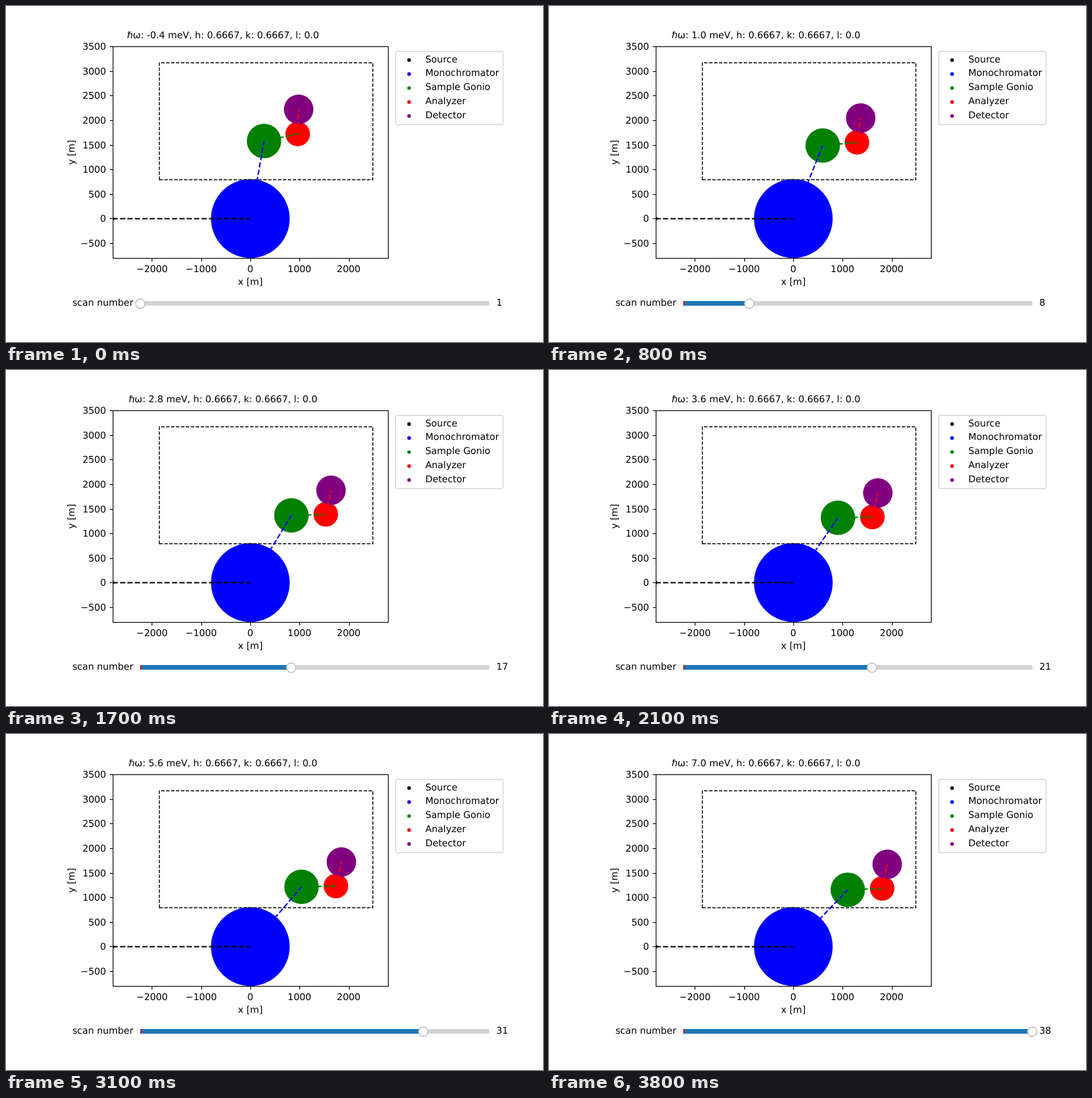
An HTML page that plays this animation: 800 by 500 pixels, repeating every 3.9 s.

```html
<!DOCTYPE html>
<html lang="en">
<head>
<meta charset="utf-8">
<title>Spectrometer scan</title>
<style>
  html, body { margin: 0; width: 100%; height: 100%; overflow: hidden; background: #fff; }
  svg { display: block; width: 800px; height: 500px; }
  text { font: 13.889px "DejaVu Sans", sans-serif; text-rendering: geometricPrecision; white-space: pre; }
</style>
</head>
<body>
<svg id="stage" viewBox="0 0 800 500" xmlns="http://www.w3.org/2000/svg">
  <defs><clipPath id="plot"><rect x="159" y="60" width="410" height="315"/></clipPath></defs>
</svg>
<script>
const stage = document.getElementById('stage');
const SCALE = 315 / 4300;
const px = x => 364 + x * SCALE;
const py = y => 316.4 - y * SCALE;
const snap = v => Math.floor(v + 0.5) + 0.5;

function set(el, attrs) {
  for (const key in attrs) el.setAttribute(key, attrs[key]);
  return el;
}
function add(tag, attrs, parent = stage) {
  return parent.appendChild(set(document.createElementNS('http://www.w3.org/2000/svg', tag), attrs));
}
function label(str, x, y, anchor = 'start', more = {}) {
  const el = add('text', { x, y, 'text-anchor': anchor, ...more });
  el.textContent = str;
  return el;
}
const minus = v => String(v).replace('-', '\u2212');

// Plot contents
const plot = add('g', { 'clip-path': 'url(#plot)' });
const disc = (r, fill) => add('circle', { cx: px(0), cy: py(0), r: r * SCALE, fill }, plot);
const beam = stroke => add('line', {
  x1: px(0), y1: py(0), x2: px(0), y2: py(0),
  stroke, 'stroke-width': 2.083, 'stroke-dasharray': '7.71 3.33'
}, plot);

add('circle', { cx: px(-2800), cy: py(0), r: 2.7 }, plot);
disc(800, 'blue');
const sample = disc(350, 'green');
const analyzer = disc(250, 'red');
const detector = disc(300, 'purple');
add('path', {
  d: 'M228.5 258.5H546.5V84.5H228.5Z', fill: 'none', stroke: '#000',
  'stroke-width': 1.39, 'stroke-dasharray': '5.14 2.22'
}, plot);
set(beam('black'), { x1: px(-2800), y1: 316.5, y2: 316.5 });
const toSample = beam('blue');
const toAnalyzer = beam('green');
const toDetector = beam('red');

// Axes
const frame = { fill: 'none', stroke: '#000', 'stroke-width': 1.11 };
add('rect', { x: 159.5, y: 60.5, width: 410, height: 315, ...frame });
for (let v = -2000; v <= 2000; v += 1000) {
  add('path', { d: `M${snap(px(v))} 375.5v4.9`, ...frame });
  label(minus(v), px(v), 396, 'middle');
}
for (let v = -500; v <= 3500; v += 500) {
  add('path', { d: `M159.5 ${snap(py(v))}h-4.9`, ...frame });
  label(minus(v), 149.2, Math.round(py(v) + 5), 'end');
}
label('x [m]', 364, 415, 'middle');
label('y [m]', 0, 0, 'middle', { transform: 'translate(102 217.7) rotate(-90)' });
const title = label('', 323.3, 48, 'middle');

// Legend
add('rect', {
  x: 580.5, y: 67.5, width: 160, height: 109, rx: 2.8,
  fill: '#fff', stroke: '#ccc', 'stroke-opacity': 0.8, 'stroke-width': 1.39
});
[['Source', 'black'], ['Monochromator', 'blue'], ['Sample Gonio', 'green'],
 ['Analyzer', 'red'], ['Detector', 'purple']].forEach(([name, fill], i) => {
  add('circle', { cx: 600.5, cy: 80.4 + 20.85 * i, r: 2.7, fill });
  label(name, 624.8, Math.floor(84 + 20.75 * i));
});

// Slider
label('scan number', 189.6, 446, 'end');
add('rect', { x: 200, y: 439, width: 520, height: 7, fill: 'lightgray' });
const filled = add('rect', { x: 200, y: 439, width: 0, height: 7, fill: '#1f77b4' });
add('rect', { x: 200, y: 439, width: 1.5, height: 7, fill: 'red' });
const knob = add('circle', { cx: 200, cy: 443, r: 6.95, fill: '#fff', stroke: '#bfbfbf', 'stroke-width': 1.39 });
const value = label('', 730.4, 446);

// Scattering geometry: energies in meV, wave numbers in 1/Å
const EF = 4.8, Q2 = 2.7855;
const k2 = e => e / 2.072;
const bragg = e => 2 * Math.asin(1.348 / Math.sqrt(e));
const step = (p, dist, angle) => ({ x: p.x + dist * Math.cos(angle), y: p.y + dist * Math.sin(angle) });

function link(line, a, b, target) {
  set(line, { x1: px(a.x), y1: py(a.y), x2: px(b.x), y2: py(b.y) });
  set(target, { cx: px(b.x), cy: py(b.y) });
}

function draw(n) {
  const transfer = (n - 3) / 5;
  const ei = EF + transfer;
  const ki2 = k2(ei), kf2 = k2(EF);
  const inAngle = bragg(ei);
  const outAngle = inAngle - Math.acos((ki2 + kf2 - Q2) / (2 * Math.sqrt(ki2 * kf2)));

  const mono = { x: 0, y: 0 };
  const s = step(mono, 1600, inAngle);
  const a = step(s, 700, outAngle);
  const d = step(a, 500, outAngle + bragg(EF));
  link(toSample, mono, s, sample);
  link(toAnalyzer, s, a, analyzer);
  link(toDetector, a, d, detector);

  title.textContent = `\u210fω: ${transfer.toFixed(1)} meV, h: 0.6667, k: 0.6667, l: 0.0`;
  const width = (n - 1) / 37 * 520;
  set(filled, { width });
  set(knob, { cx: 200 + width });
  value.textContent = n;
}

let shown = 0;
const start = performance.now();
function tick() {
  const t = (performance.now() - start) % 3900;
  const n = Math.max(1, Math.floor(t / 100));
  if (n !== shown) draw(shown = n);
  requestAnimationFrame(tick);
}
tick();
</script>
</body>
</html>
```
